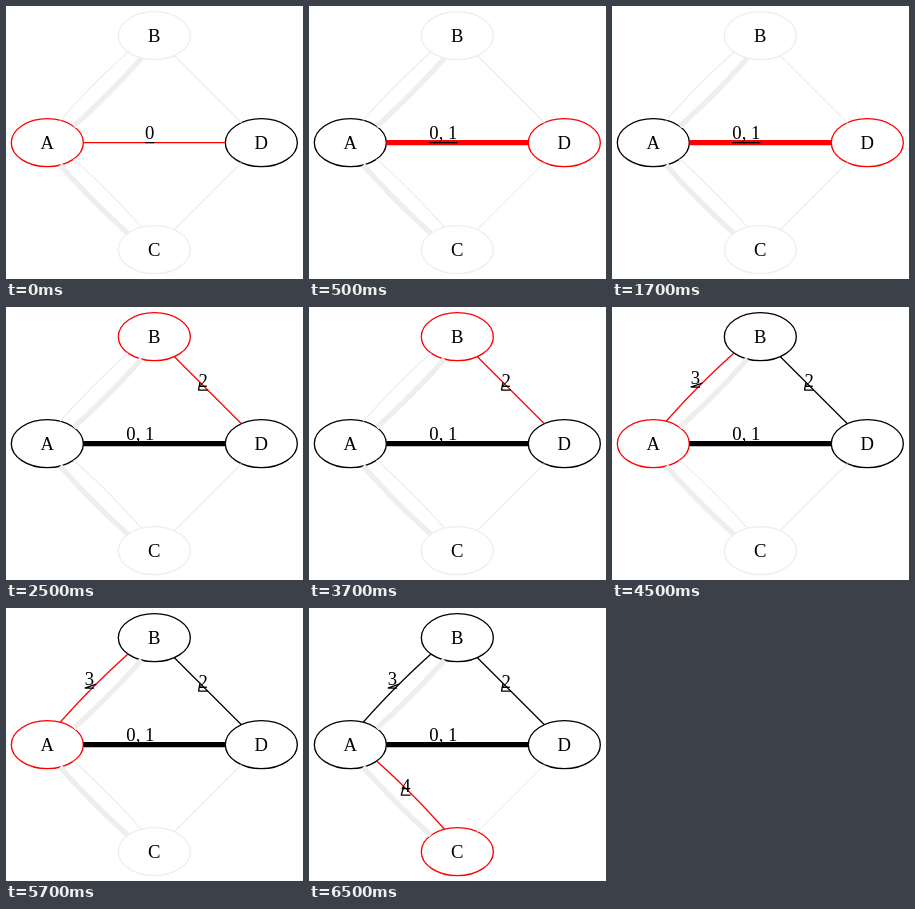
An HTML page with a canvas for the animation above (8000 ms loop, 297 px wide and 273 px high).

```html
<!DOCTYPE html>
<html lang="en">
<head>
<meta charset="utf-8">
<title>Graph walk</title>
<style>
  html, body { margin: 0; width: 100%; height: 100%; overflow: hidden; background: #fff; }
  canvas { display: block; width: 297px; height: 273px; }
</style>
</head>
<body>
<canvas id="stage"></canvas>
<script>
const W = 297, H = 273, LOOP = 8000;
const FIRST = 500, STEP = 2000;
const RX = 36, RY = 24, RING = 107;
const THIN = 4 / 3, THICK = 16 / 3;
const DIM = '#eeeeee', HOT = '#ff0000', INK = '#000000';

const canvas = document.getElementById('stage');
const ctx = canvas.getContext('2d');
const ratio = window.devicePixelRatio || 1;
canvas.width = W * ratio;
canvas.height = H * ratio;
ctx.scale(ratio, ratio);

// Four nodes spaced evenly on a ring.
const nodes = {};
[...'ABDC'].forEach((name, i) => {
  const angle = Math.PI + i * Math.PI / 2;
  nodes[name] = { x: 148.33 + RING * Math.cos(angle), y: 136.67 + RING * Math.sin(angle) };
});

// Step i moves from path[i] to path[i + 1].
const path = 'DADBAC';

// Double edges run in two lanes, one on each side of the straight line.
const edges = [
  { ends: 'AB', lane: 1, steps: [3] },
  { ends: 'AB', lane: -1, steps: [], wide: true },
  { ends: 'AC', lane: 1, steps: [4] },
  { ends: 'AC', lane: -1, steps: [], wide: true },
  { ends: 'AD', lane: 0, steps: [0, 1] },
  { ends: 'BD', lane: 0, steps: [2] },
  { ends: 'CD', lane: 0, steps: [] }
];

const outside = (p, n) => Math.hypot((p.x - n.x) / RX, (p.y - n.y) / RY) >= 1;

// Points along an edge, cut off at the rims of its two nodes.
function trace({ ends, lane }) {
  const [a, b] = [...ends].map(name => nodes[name]);
  const dx = b.x - a.x, dy = b.y - a.y, len = Math.hypot(dx, dy);
  const points = [];
  for (let t = 0; t <= 1; t += 1 / 600) {
    const off = lane * (4.8 + 14 * t * (1 - t));
    const p = { x: a.x + dx * t + dy / len * off, y: a.y + dy * t - dx / len * off };
    if (outside(p, a) && outside(p, b)) points.push(p);
  }
  return points;
}
for (const edge of edges) edge.points = trace(edge);

function stroke(color, width) {
  ctx.strokeStyle = color;
  ctx.lineWidth = width;
  ctx.stroke();
}

function drawNode(name, step) {
  const { x, y } = nodes[name];
  const seen = path.slice(0, step + 2).includes(name);
  ctx.beginPath();
  ctx.ellipse(x, y, RX, RY, 0, 0, Math.PI * 2);
  stroke(path[step + 1] === name ? HOT : seen ? INK : DIM, THIN);
  ctx.fillText(name, x, y + 6.4);
}

function drawEdge({ points, steps, wide }, step) {
  const done = steps.filter(s => s <= step);
  const color = done.includes(step) ? HOT : done.length ? INK : DIM;
  ctx.beginPath();
  for (const p of points) ctx.lineTo(p.x, p.y);
  stroke(color, wide || done.length > 1 ? THICK : THIN);
  if (done.length) drawLabel(done.join(', '), points);
}

// The label's lower right corner sits midway between the edge's ends;
// its underline continues to the nearest point of the edge.
function drawLabel(text, points) {
  const first = points[0], last = points[points.length - 1];
  const right = (first.x + last.x) / 2, base = (first.y + last.y) / 2;
  const width = ctx.measureText(text).width;
  const x = right - width / 2, y = base - 11;
  const gap = p => Math.hypot(p.x - x, p.y - y);
  const tie = points.reduce((best, p) => gap(p) < gap(best) ? p : best);
  ctx.beginPath();
  ctx.moveTo(right, base);
  ctx.lineTo(right - width, base);
  ctx.lineTo(tie.x, tie.y);
  stroke(INK, THIN);
  ctx.fillText(text, x, base - 3.5);
}

function draw(step) {
  ctx.fillStyle = '#fff';
  ctx.fillRect(0, 0, W, H);
  ctx.fillStyle = INK;
  ctx.font = '18.67px "Liberation Serif", "Times New Roman", serif';
  ctx.textAlign = 'center';
  ctx.lineJoin = 'bevel';
  for (const name in nodes) drawNode(name, step);
  for (const edge of edges) drawEdge(edge, step);
}

const origin = performance.now();
function tick() {
  const t = (performance.now() - origin) % LOOP;
  draw(Math.floor((t - FIRST) / STEP) + 1);
  requestAnimationFrame(tick);
}
tick();
</script>
</body>
</html>
```
